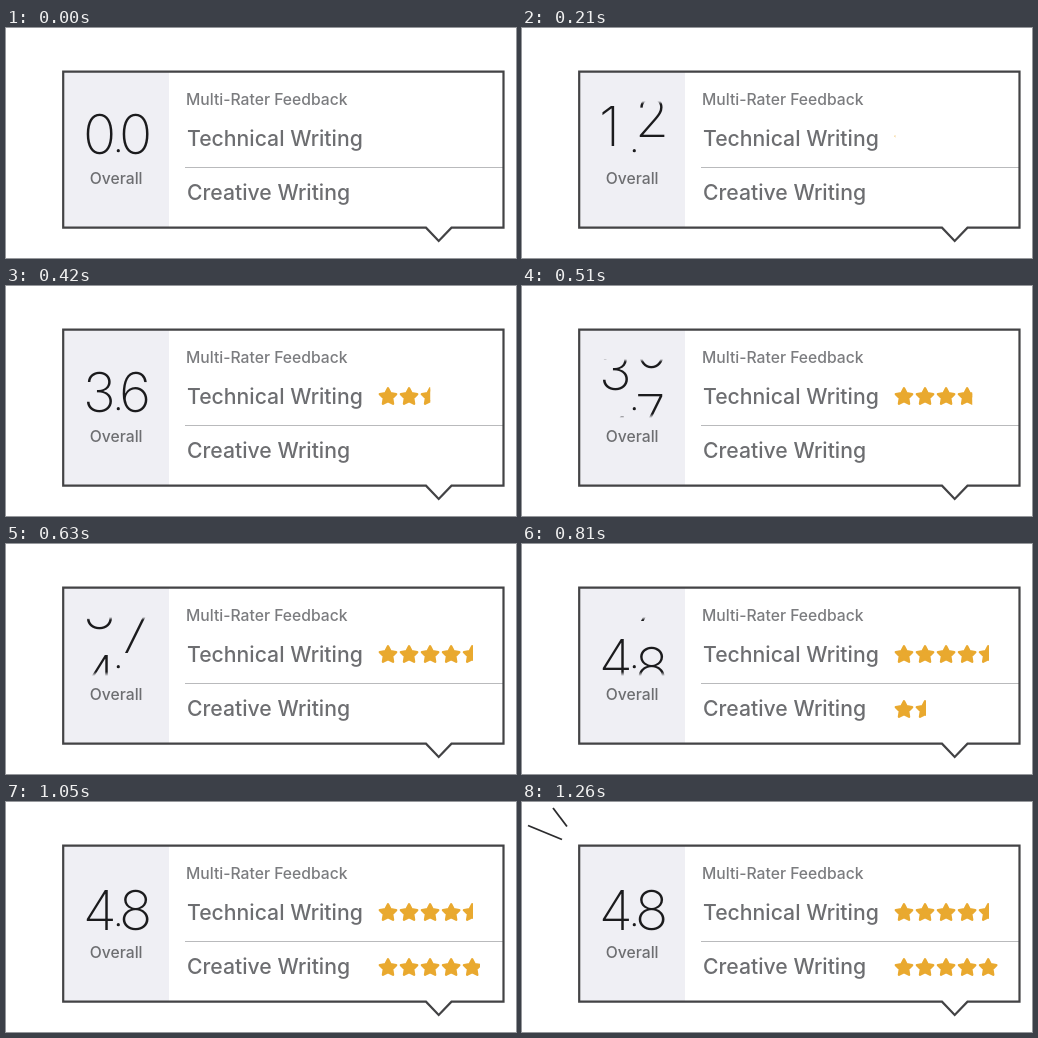
An HTML page for the animation above (1.41 s loop, 510x230 px).

```html
<!DOCTYPE html>
<html lang="en">
<head>
<meta charset="utf-8">
<title>Rating card</title>
<style>
  html, body { margin: 0; width: 100%; height: 100%; overflow: hidden; background: #fff; }
  svg { display: block; width: 100vw; height: 100vh; }
  text { font-family: Inter, "Open Sans", sans-serif; font-weight: 500; fill: #6d6e71; }
  .big { font-size: 21.2px; }
  .small { font-size: 15.7px; }
  .digits text { font-size: 55px; font-weight: 200; fill: #1b1b1d; }
  .rays { stroke: #2b2b2d; stroke-width: 1.8; }
</style>
</head>
<body>
<svg viewBox="0 0 510 230">
  <defs>
    <linearGradient id="fade" gradientUnits="userSpaceOnUse" x1="0" y1="73" x2="0" y2="132">
      <stop offset="0" stop-color="#000"/>
      <stop offset=".05" stop-color="#fff"/>
      <stop offset=".93" stop-color="#fff"/>
      <stop offset="1" stop-color="#000"/>
    </linearGradient>
    <mask id="window" maskUnits="userSpaceOnUse" x="60" y="73" width="102" height="59">
      <rect x="60" y="73" width="102" height="59" fill="url(#fade)"/>
    </mask>
    <clipPath id="clip0"><rect x="372" y="95" width="0" height="30"/></clipPath>
    <clipPath id="clip1"><rect x="372" y="150" width="0" height="30"/></clipPath>
    <path id="star" fill="#e9a92f" stroke="#e9a92f" stroke-width="2.4" stroke-linejoin="round"/>
  </defs>

  <path d="M57.2 43.7H497.5V199.7H445.5L432.7 213L420 199.7H57.2Z" fill="#fff"/>
  <rect x="58" y="44" width="105" height="155" fill="#efeff4"/>
  <path d="M179 139.5H497" stroke="#b9babc"/>
  <path d="M57.2 43.7H497.5V199.7H445.5L432.7 213L420 199.7H57.2Z" fill="none" stroke="#434345" stroke-width="2.2"/>

  <text class="small" x="180" y="77" fill-opacity=".9">Multi-Rater Feedback</text>
  <text class="big" x="181" y="118">Technical Writing</text>
  <text class="big" x="181" y="172">Creative Writing</text>
  <text class="small" x="110.2" y="156" text-anchor="middle">Overall</text>

  <g class="digits" mask="url(#window)">
    <g id="ones"></g>
    <g id="tenths"></g>
  </g>
  <circle cx="112.3" cy="122.7" r="1.6" fill="#1b1b1d"/>

  <g id="row0" clip-path="url(#clip0)"></g>
  <g id="row1" clip-path="url(#clip1)"></g>

  <g class="rays">
    <line x1="40" y1="37.5"/>
    <line x1="45" y1="24.5"/>
  </g>
</svg>
<script>
const LOOP = 1410, STEP = 30, PITCH = 66;
const $ = s => document.querySelector(s);
const NS = "http://www.w3.org/2000/svg";

function add(parent, tag, attrs, text = "") {
  const el = document.createElementNS(NS, tag);
  for (const k in attrs) el.setAttribute(k, attrs[k]);
  el.textContent = text;
  parent.append(el);
}

function bezier(x1, y1, x2, y2) {
  const at = (a, b, t) => 3 * (1 - t) ** 2 * t * a + 3 * (1 - t) * t * t * b + t ** 3;
  return x => {
    if (x <= 0) return 0;
    if (x >= 1) return 1;
    let lo = 0, hi = 1;
    for (let i = 0; i < 30; i++) {
      const mid = (lo + hi) / 2;
      if (at(x1, x2, mid) < x) lo = mid; else hi = mid;
    }
    return at(y1, y2, lo);
  };
}

const spin = bezier(.33, 0, 0, 1);
const smooth = bezier(.33, 0, .67, 1);
const span = (t, a, b) => (t - a) / (b - a);

// Digit wheels
const wheels = [
  { el: $("#ones"), x: 77, last: 4 },
  { el: $("#tenths"), x: 113, last: 8 }
];
for (const w of wheels)
  for (let n = 0; n <= w.last; n++) add(w.el, "text", { x: w.x, y: 125.5 + n * PITCH }, n);

// Star rows
const points = Array.from({ length: 10 }, (_, i) => {
  const a = (i / 5 - .5) * Math.PI, r = i % 2 ? 4.4 : 8.6;
  return (r * Math.cos(a)).toFixed(2) + " " + (r * Math.sin(a)).toFixed(2);
});
$("#star").setAttribute("d", "M" + points.join("L") + "Z");
const rows = [
  { y: 110.8, from: 180, to: 630, width: 95 },
  { y: 165.8, from: 650, to: 1085, width: 104 }
];
rows.forEach((row, i) => {
  row.clip = $(`#clip${i} rect`);
  for (let n = 0; n < 5; n++) add($("#row" + i), "use", { href: "#star", x: 382 + n * 21.05, y: row.y });
});

const rays = [...document.querySelectorAll(".rays line")];
const tips = [[6, 23.5], [31, 6]];

function draw(t) {
  const turn = spin(t / 1110);
  for (const w of wheels)
    w.el.setAttribute("transform", `translate(0 ${-turn * (w.last * PITCH - 2)})`);

  for (const r of rows)
    r.clip.setAttribute("width", r.width * smooth(span(t, r.from, r.to)));

  const grow = smooth(span(t, 1080, 1260));
  rays.forEach((ray, i) => {
    const x = +ray.getAttribute("x1"), y = +ray.getAttribute("y1");
    ray.setAttribute("x2", x + (tips[i][0] - x) * grow);
    ray.setAttribute("y2", y + (tips[i][1] - y) * grow);
    ray.setAttribute("visibility", grow > 0 ? "visible" : "hidden");
  });
}

const start = performance.now();
function tick() {
  const t = (performance.now() - start) % LOOP;
  draw(Math.floor(t / STEP) * STEP);
  requestAnimationFrame(tick);
}
draw(0);
tick();
</script>
</body>
</html>
```
